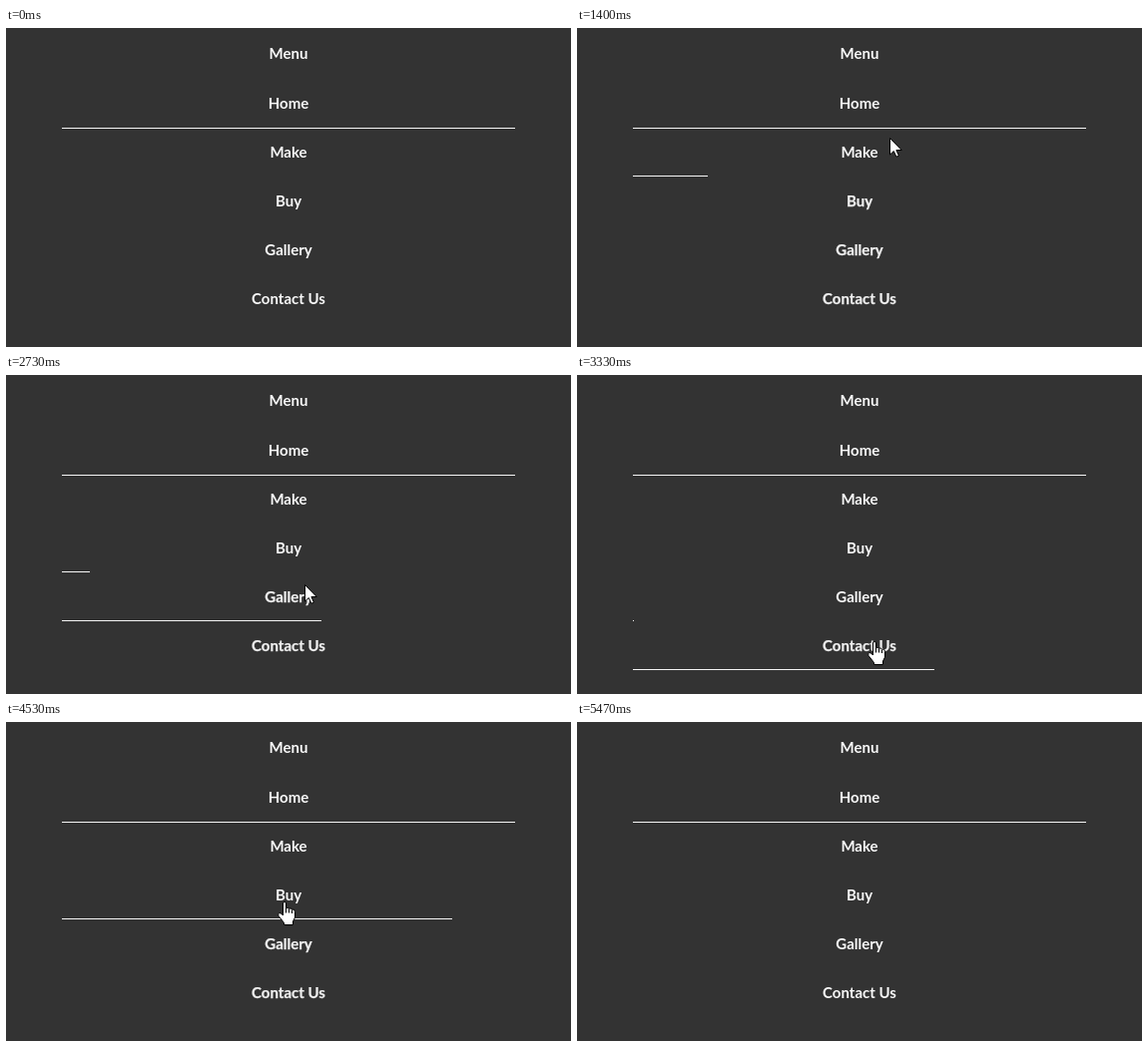
Write an HTML page that moves like this. It is 566x320 px and loops after 5.74 s.

```html
<!DOCTYPE html>
<html lang="en">
<head>
<meta charset="utf-8">
<title>Menu underline</title>
<style>
  html, body { margin: 0; width: 100%; height: 100%; overflow: hidden; background: #333; }
  svg { display: block; }
  text { font: 700 15px Lato, "Open Sans", sans-serif; text-anchor: middle; fill: #f8f8f8; }
  text.soft { fill: #f0f0f0; stroke: #f0f0f0; stroke-width: .25px; }
  rect { fill: #f5f5f5; shape-rendering: crispEdges; }
  #cursor path { fill: #fff; stroke: #000; stroke-width: 1; stroke-linejoin: round; }
  #hand .crease { fill: none; }
</style>
</head>
<body>
<svg width="566" height="320" viewBox="0 0 566 320">
  <g id="menu"></g>
  <g id="cursor">
    <path id="arrow" d="M.5 .5V17L4.3 13.5L6.9 19.2L9.4 18.2L6.9 12.5H12.2Z"/>
    <g id="hand">
      <path d="M-.5 14V2Q-.5 .5 1 .5T2.5 2V7Q4 5.6 5.5 7.3Q7.2 6.2 8.4 8Q11.5 7.4 11.5 10.5V16L9.5 20V23.5H.5V21.5L-5 14.5Q-6 12 -4 11.5Q-2.5 11.5 -.5 14Z"/>
      <path class="crease" d="M2.5 7V11.5M5.5 7.5V11.5M8.5 8.5V12"/>
    </g>
  </g>
</svg>
<script>
const LOOP = 5740, STEP = 200 / 3, FADE = 300;
const LEFT = 56, FULL = 454, MID = 283;
const HOME = 1;

const labels = ["Menu", "Home", "Make", "Buy", "Gallery", "Contact Us"];

// item, pointer enters, pointer leaves
const hovers = [
  [2, 1358, 1916], [3, 1946, 2525], [4, 2634, 3053], [5, 3217, 3600],
  [4, 3700, 4180], [3, 4363, 4655], [2, 4800, 5075]
];

// key points of the pointer tip: time, x, y
const path = [
  [0, 559, 340], [266, 559, 319], [333, 559, 350], [600, 559, 314], [667, 558, 306],
  [733, 600, 290], [1000, 556, 60], [1400, 313, 110], [2000, 307, 170], [2733, 299, 210],
  [3333, 297, 267], [3933, 286, 226], [4533, 278, 180], [5000, 284, 138],
  [5133, 300, 172], [5400, 345, 330], [LOOP, 345, 330]
];

const $ = id => document.getElementById(id);
const menu = $("menu"), cursor = $("cursor"), arrow = $("arrow"), hand = $("hand");

function add(tag, attrs) {
  const el = document.createElementNS("http://www.w3.org/2000/svg", tag);
  for (const key in attrs) el.setAttribute(key, attrs[key]);
  return menu.appendChild(el);
}

const items = labels.map((label, i) => {
  const base = Math.round(31.4 + 49.15 * i);
  const row = Math.floor(51.4 + 48.73 * i);
  const text = add("text", { x: MID, y: base });
  text.textContent = label;
  const line = i >= HOME && add("rect", { x: LEFT, y: row, height: 1 });
  return { base, text, line, half: label.length * 3.9 };
});

// CSS "ease": cubic-bezier(.25, .1, .25, 1)
function ease(x) {
  if (x <= 0) return 0;
  if (x >= 1) return 1;
  let lo = 0, hi = 1;
  for (let i = 0; i < 24; i++) {
    const s = (lo + hi) / 2;
    if (0.75 * s * (1 - s) + s ** 3 < x) lo = s; else hi = s;
  }
  const s = lo, r = 1 - s;
  return 0.3 * s * r * r + 3 * r * s * s + s ** 3;
}

function tip(t) {
  const i = Math.max(1, path.findIndex(p => p[0] >= t));
  const [t0, x0, y0] = path[i - 1], [t1, x1, y1] = path[i];
  const k = (t - t0) / (t1 - t0);
  return [Math.round(x0 + (x1 - x0) * k), Math.round(y0 + (y1 - y0) * k)];
}

function draw(ms) {
  const t = Math.floor((ms + 3.5) / STEP) * STEP;
  const parts = items.map((_, i) => i === HOME ? 1 : 0);
  let moving = items.length;

  for (const [i, enter, leave] of hovers) {
    const grown = ease((Math.min(t, leave) - enter) / FADE);
    parts[i] = Math.max(parts[i], grown * (1 - ease((t - leave) / FADE)));
    if (parts[i] > 0 && parts[i] < 1) moving = Math.min(moving, i);
  }
  items.forEach(({ line, text }, i) => {
    if (line) line.setAttribute("width", Math.round(FULL * parts[i]));
    text.setAttribute("class", i > moving ? "soft" : "");
  });

  const [x, y] = tip(t);
  const onLink = items.some(({ base, half }, i) =>
    i > HOME && Math.abs(x - MID) <= half && Math.abs(y - base + 5) <= 10);
  cursor.setAttribute("transform", `translate(${x} ${y})`);
  arrow.style.display = onLink ? "none" : "";
  hand.style.display = onLink ? "" : "none";
}

const start = performance.now();
function tick() {
  draw((performance.now() - start) % LOOP);
  requestAnimationFrame(tick);
}
tick();
</script>
</body>
</html>
```
